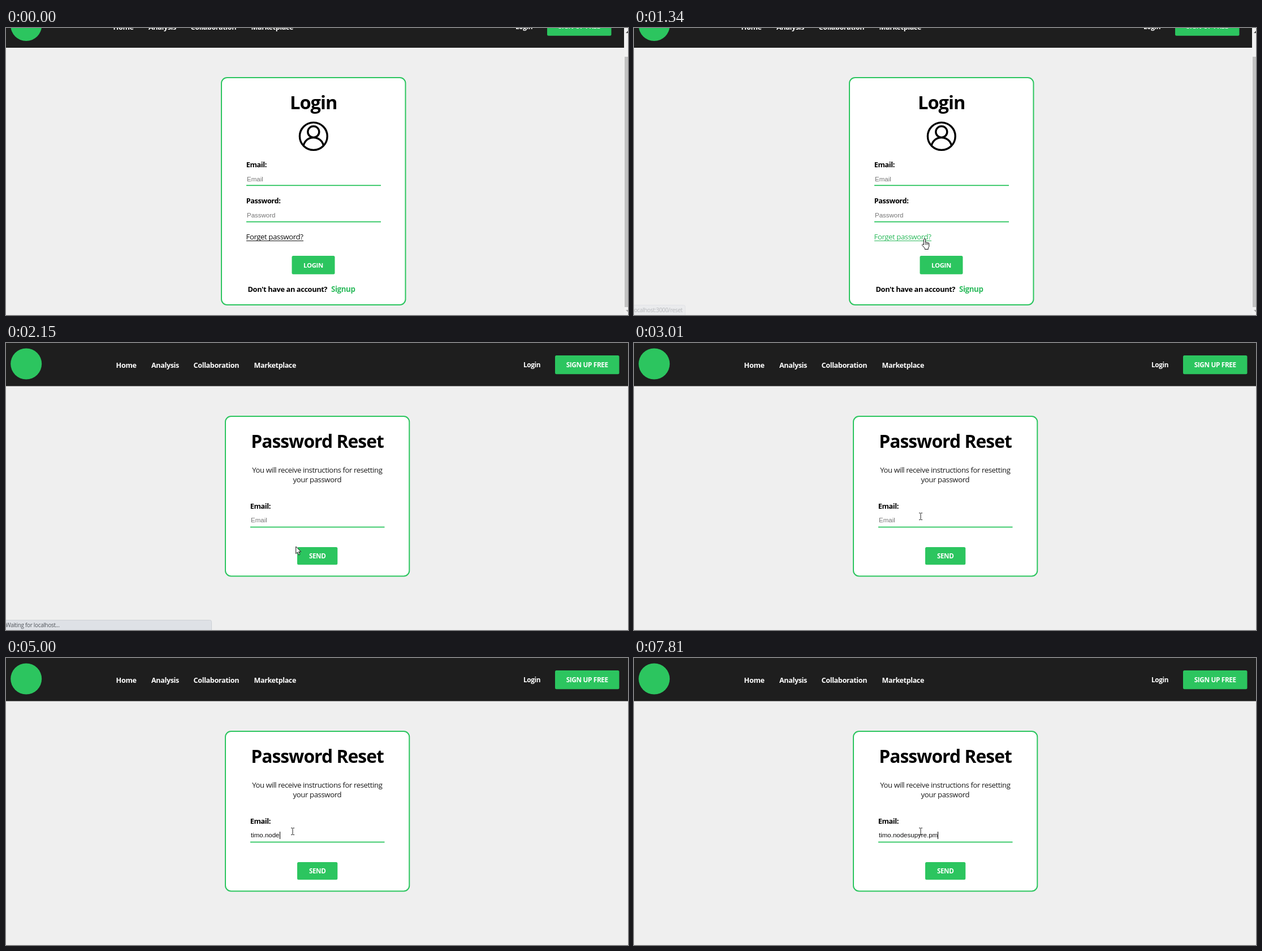
An HTML page with a canvas that plays this animation: 1100 by 509 pixels, repeating every 8000 ms.

```html
<!DOCTYPE html>
<html lang="en">
<head>
<meta charset="utf-8">
<title>Password reset</title>
<style>
  html, body { margin: 0; width: 100%; height: 100%; overflow: hidden; background: #efefef; }
  canvas { display: block; width: 100vw; height: 100vh; }
</style>
</head>
<body>
<canvas id="stage" width="1100" height="509"></canvas>
<script>
const ctx = document.getElementById('stage').getContext('2d');
const LOOP = 8000;
const GREEN = '#2cc55f', DARK = '#1e1e1e', PAGE = '#efefef';
const UI = '"Open Sans", "Noto Sans", sans-serif';
const FIELD = '"Liberation Sans", Arial, sans-serif';

const EMAIL = 'timo.nodesupyre.pm';
const KEY_TIMES = [3080, 3350, 3480, 3610, 4000, 4140, 4540, 4740, 5000,
                   5530, 5620, 5820, 6350, 6680, 6810, 7340, 7610, 7810];
const RESET_AT = 2150;

const ARROW = new Path2D('M0 0V12.6L2.9 10L5 14.8L7.1 13.9L5 9.2H8.9Z');
const HAND = new Path2D('M3.7 11.5V2a1.5 1.5 0 0 1 3 0V7.3a1.2 1.2 0 0 1 2.2.5' +
  'a1.2 1.2 0 0 1 2.2.6a1 1 0 0 1 1.9.7V14.3L11.5 17V19.3H5.5V17.3L.9 12.2a1.3 1.3 0 0 1 2-1.6Z');

const clamp = (v) => Math.min(1, Math.max(0, v));
const ease = (p) => p * p * (3 - 2 * p);
const mix = (a, b, p) => a + (b - a) * p;
// Progress that advances in visible steps, like a sampled pointer.
const stepped = (t, start, gap, count) =>
  ease(clamp(Math.floor((t - start) / gap) / count));

function rect(x, y, w, h, color) {
  ctx.fillStyle = color;
  ctx.fillRect(x, y, w, h);
}

function rounded(x, y, w, h, r, fill, stroke, line = 2) {
  ctx.beginPath();
  ctx.roundRect(x, y, w, h, r);
  ctx.fillStyle = fill;
  ctx.fill();
  if (stroke) {
    ctx.strokeStyle = stroke;
    ctx.lineWidth = line;
    ctx.stroke();
  }
}

function label(str, x, y, size, { color = '#000', weight = 700, align = 'left' } = {}) {
  ctx.font = `${weight} ${size}px ${UI}`;
  ctx.letterSpacing = `${-0.03 * size}px`;
  ctx.textAlign = align;
  ctx.fillStyle = color;
  ctx.fillText(str, x, y);
}

function fieldText(str, x, y, color) {
  ctx.font = `11.5px ${FIELD}`;
  ctx.letterSpacing = '0px';
  ctx.textAlign = 'left';
  ctx.fillStyle = color;
  ctx.fillText(str, x, y);
  return x + ctx.measureText(str).width;
}

function button(str, x, y, w, h, size) {
  rounded(x, y, w, h, 2.5, GREEN);
  label(str, x + w / 2, y + h / 2 + 4.3, size, { color: '#fff', align: 'center' });
}

function header(dy, menuShift, rightShift) {
  const white = { color: '#fff' };
  ctx.save();
  ctx.translate(0, dy);
  rect(0, 0, 1100, 76.5, DARK);
  ctx.beginPath();
  ctx.arc(35.7, 37, 27.5, 0, Math.PI * 2);
  ctx.fillStyle = GREEN;
  ctx.fill();
  ctx.translate(menuShift, 0);
  label('Home', 194.6, 44, 12.7, white);
  label('Analysis', 257, 44, 12.6, white);
  label('Collaboration', 331.6, 44, 12.6, white);
  label('Marketplace', 438.6, 44, 12.5, white);
  ctx.translate(rightShift - menuShift, 0);
  label('Login', 915, 43.4, 11.8, white);
  button('SIGN UP FREE', 971, 22, 113.5, 33.3, 11.8);
  ctx.restore();
}

function triangle(x, y, dir, color) {
  ctx.beginPath();
  ctx.moveTo(x - 4, y);
  ctx.lineTo(x + 4, y);
  ctx.lineTo(x, y + 4 * dir);
  ctx.fillStyle = color;
  ctx.fill();
}

function scrollbar() {
  rect(1093, 0, 7, 509, '#f1f1f1');
  rect(1094, 51, 6, 444, '#c1c1c1');
  triangle(1100, 9, -1, '#505050');
  triangle(1100, 500, 1, '#a3a3a3');
}

function userIcon(x, y) {
  ctx.strokeStyle = '#000';
  ctx.lineWidth = 3.4;
  ctx.save();
  ctx.beginPath();
  ctx.arc(x, y, 24.5, 0, Math.PI * 2);
  ctx.clip();
  ctx.beginPath();
  ctx.arc(x, y + 20.5, 18.2, Math.PI * 0.9, Math.PI * 2.1);
  ctx.stroke();
  ctx.restore();
  ctx.beginPath();
  ctx.arc(x, y - 7.8, 10, 0, Math.PI * 2);
  ctx.fillStyle = '#fff';
  ctx.fill();
  ctx.stroke();
  ctx.beginPath();
  ctx.arc(x, y, 24.4, 0, Math.PI * 2);
  ctx.stroke();
}

function loginPage(hover) {
  header(-41.5, -5, -14);
  scrollbar();
  rounded(381, 88, 325.5, 403, 10, '#fff', GREEN);
  label('Login', 543.7, 143.5, 32.6, { align: 'center' });
  userIcon(543.8, 192);
  label('Email:', 424.7, 247, 12.7);
  fieldText('Email', 426, 272, '#757575');
  rect(425, 278.3, 238, 1.8, GREEN);
  label('Password:', 424.7, 311, 12.7);
  fieldText('Password', 426, 336.3, '#757575');
  rect(425, 342.8, 238, 1.8, GREEN);
  const link = hover ? '#2cba5c' : '#111';
  label('Forget password?', 424.6, 375, 13.1, { color: link, weight: 400 });
  rect(425, 377, 101, 1, link);
  button('LOGIN', 505.5, 404, 76, 32.7, 11.4);
  label("Don't have an account?", 427.5, 467.6, 12.8);
  label('Signup', 575, 467.6, 13.3, { color: '#2cba5c' });
}

function resetPage(t) {
  header(0, 0, 0);
  rounded(388, 130, 325.3, 283.5, 10, '#fff', GREEN);
  label('Password Reset', 550.5, 185.5, 31.8, { align: 'center' });
  const note = { color: '#1a1a1a', weight: 400, align: 'center' };
  label('You will receive instructions for resetting', 550.3, 230, 13.15, note);
  label('your password', 550.3, 247, 13.15, note);
  label('Email:', 431.7, 294, 12.7);
  rect(432, 325.6, 237.5, 1.8, GREEN);
  button('SEND', 515, 362, 71.3, 31.3, 11.6);

  const typed = KEY_TIMES.filter((k) => t >= k).length;
  let caret = 433;
  if (typed) caret = fieldText(EMAIL.slice(0, typed), 433, 318.3, '#111');
  else fieldText('Email', 433, 318.3, '#757575');
  if (typed || (t >= 2480 && t < 3010)) rect(Math.round(caret), 308, 1, 13, '#000');
}

function status(str, x, width, alpha) {
  if (alpha <= 0) return;
  ctx.save();
  ctx.globalAlpha = alpha;
  rounded(-4, 491.5, width + 3.5, 22, 3, '#dee1e6', '#cdd0d5', 1);
  label(str, x, 504, 9.95, { color: '#50545a', weight: 400 });
  ctx.restore();
}

function drawStatus(t) {
  if (t >= 1340 && t < 1880) {
    const shown = clamp((1 + Math.floor((t - 1340) / 70)) / 3);
    status('localhost:3000/reset', -2.3, 91, shown);
  } else if (t >= 1880 && t < 2620) {
    status('Waiting for localhost...', -0.8, 364, 1 - clamp((t - 2420) / 200));
  }
}

function pointerAt(t) {
  if (t < 460) return null;
  if (t < RESET_AT) {
    const p = stepped(t, 460, 68, 11);
    const x = mix(893, 514, p), y = mix(479, 374, p);
    const hover = x < 526 && y < 380;
    return { x, y, hover, kind: hover && t < 1950 ? 'hand' : 'arrow' };
  }
  const p = stepped(t, 2165, 65, 5);
  const x = mix(512.7, 507, p), y = mix(361, 307, p);
  return { x, y, kind: y < 326 ? 'beam' : 'arrow' };
}

function drawPointer({ x, y, kind }) {
  if (kind === 'beam') {
    rect(x - 0.5, y - 5, 1, 11, '#222');
    for (const edge of [-6, 6]) {
      rect(x - 3, y + edge, 2.5, 1, '#222');
      rect(x + 0.5, y + edge, 2.5, 1, '#222');
    }
    return;
  }
  const shape = kind === 'hand' ? HAND : ARROW;
  ctx.save();
  ctx.translate(kind === 'hand' ? x - 5.2 : x, kind === 'hand' ? y - 0.8 : y);
  ctx.fillStyle = '#fff';
  ctx.strokeStyle = '#111';
  ctx.lineWidth = 1;
  ctx.fill(shape);
  ctx.stroke(shape);
  if (kind === 'hand') {
    for (const fx of [6.7, 8.9, 11]) rect(fx - 0.4, 8, 0.8, 3.4, '#111');
  }
  ctx.restore();
}

function draw(t) {
  const pointer = pointerAt(t);
  rect(0, 0, 1100, 509, PAGE);
  if (t < RESET_AT) loginPage(pointer && pointer.hover);
  else resetPage(t);
  drawStatus(t);
  if (pointer) drawPointer(pointer);
}

const start = performance.now();
function frame() {
  draw((performance.now() - start) % LOOP);
  requestAnimationFrame(frame);
}
frame();
</script>
</body>
</html>
```
